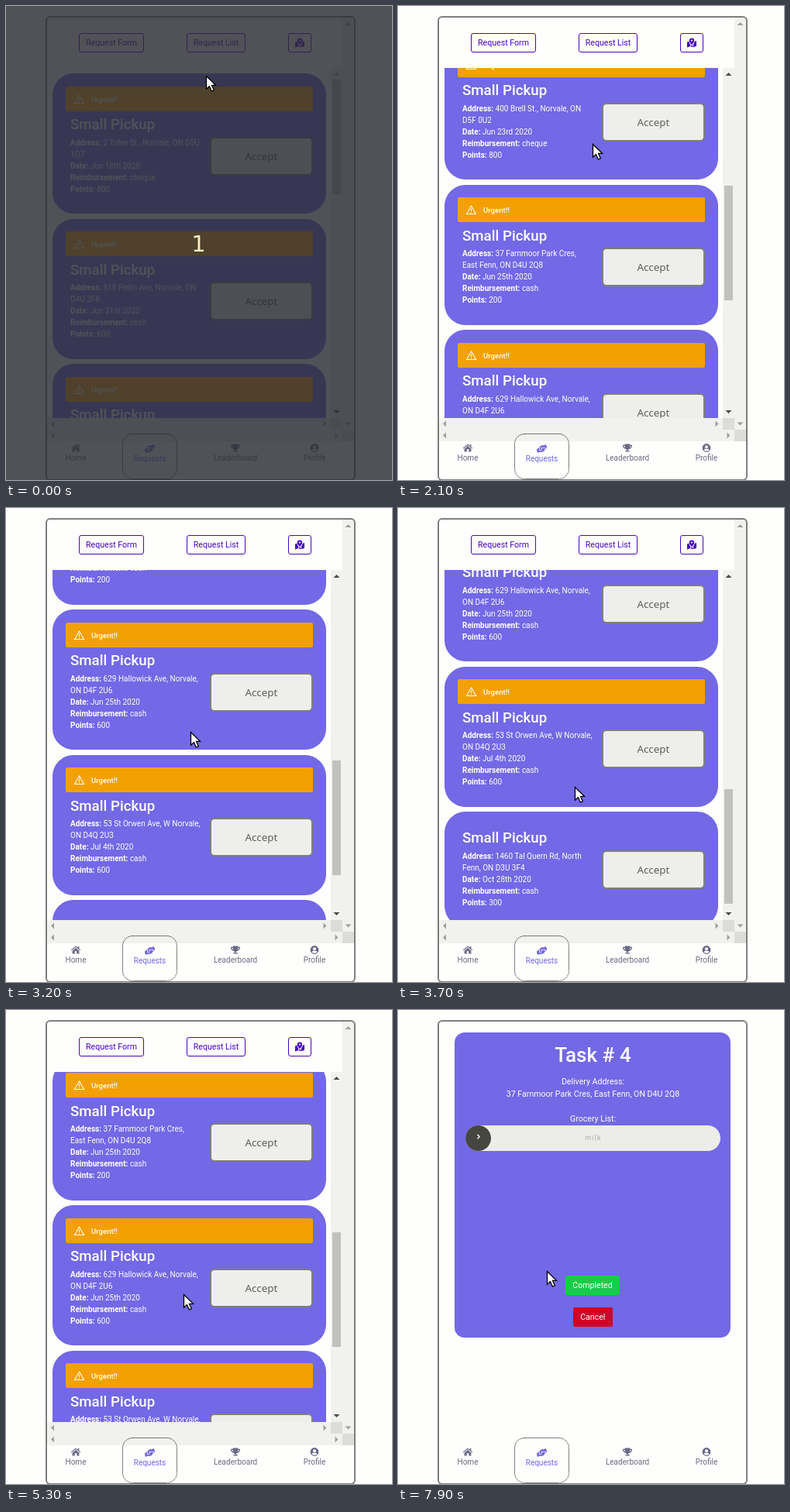
Write an HTML page that moves like this. It is 498 px wide and 612 px high and loops after 8 s.

```html
<!DOCTYPE html>
<html lang="en">
<head>
<meta charset="utf-8">
<title>Pickup requests</title>
<style>
  html, body { margin: 0; width: 100%; height: 100%; overflow: hidden; background: #fefefc; }
  svg { display: block; width: 498px; height: 612px; font-family: Roboto, sans-serif; }
</style>
</head>
<body>
<script>
const LOOP = 8000, STEP = 100, MAX_SCROLL = 837;
const PAGE = '#fefefc', PURPLE = '#7368e6', INDIGO = '#4705c0', GREY = '#6b6a86';
const TRACK = '#f1f1ee', CORNER = '#dcdcd9', FAINT = '#a0a09d', DARK = '#4a4a48';

const cards = [
  ['2 Tolve St., Norvale, ON D5U', '1Q7', 'Jun 18th 2020', 'cheque', 800],
  ['518 Pellin Ave, Norvale, ON', 'D4U 3F8', 'Jun 21st 2020', 'cash', 600],
  ['400 Brell St., Norvale, ON', 'D5F 0U2', 'Jun 23rd 2020', 'cheque', 800],
  ['37 Farnmoor Park Cres,', 'East Fenn, ON D4U 2Q8', 'Jun 25th 2020', 'cash', 200],
  ['629 Hallowick Ave, Norvale,', 'ON D4F 2U6', 'Jun 25th 2020', 'cash', 600],
  ['53 St Orwen Ave, W Norvale,', 'ON D4Q 2U3', 'Jul 4th 2020', 'cash', 600],
  ['1460 Tal Quern Rd, North', 'Fenn, ON D3U 3F4', 'Oct 28th 2020', 'cash', 300],
];

// time, pointer x, pointer y, scroll offset
const track = [
  [0, 258, 90, 0], [1000, 258, 90, 0], [1300, 265, 115, 166], [2100, 251, 178, 419],
  [3200, 238, 289, 706], [3700, 228, 360, 820], [3800, 227, 363, 832], [3900, 227, 363, 832],
  [4000, 227, 364, 837], [4100, 227, 364, 837], [4200, 227, 366, 837], [4300, 227, 366, 837],
  [4400, 227, 368, 837], [4500, 227, 368, 837], [4600, 227, 368, 827], [5300, 229, 367, 585],
  [6300, 307, 287, 468], [6400, 320, 287, 468], [6500, 317, 287, 468], [7000, 317, 287, 468],
  [7300, 274, 313, 468], [7400, 274, 313, 468], [7700, 232, 347, 468], [7900, 192, 337, 468],
];

function add(parent, tag, attrs, text) {
  const node = document.createElementNS('http://www.w3.org/2000/svg', tag);
  for (const k in attrs) node.setAttribute(k, attrs[k]);
  if (text !== undefined) node.textContent = text;
  parent.append(node);
  return node;
}
const group = (p, attrs = {}) => add(p, 'g', attrs);
const rect = (p, x, y, width, height, fill, rx = 0, more = {}) =>
  add(p, 'rect', { x, y, width, height, fill, rx, ...more });
const path = (p, d, more = {}) => add(p, 'path', { d, ...more });
const label = (p, x, y, size, fill, text, more = {}) =>
  add(p, 'text', { x, y, fill, 'font-size': size, ...more }, text);
const centred = (p, x, y, size, fill, text, more = {}) =>
  label(p, x, y, size, fill, text, { 'text-anchor': 'middle', ...more });
const arrow = (p, x, y, turn, fill = FAINT) =>
  path(p, 'M-4 2L0 -2L4 2Z', { fill, transform: `translate(${x} ${y}) rotate(${turn})` });
const moveTo = (node, x, y) => node.setAttribute('transform', `translate(${x} ${y})`);

const svg = add(document.body, 'svg', { viewBox: '0 0 498 612' });
rect(svg, 0, 0, 498, 612, PAGE);

// Request list
const listPage = group(svg);
const clip = add(add(svg, 'defs'), 'clipPath', { id: 'view' });
rect(clip, 53, 80, 366, 452, PAGE);
const view = group(listPage, { 'clip-path': 'url(#view)' });

function makeCard(info, i) {
  const urgent = i < 6, lift = urgent ? 0 : 31.7;
  const root = group(view);
  rect(root, 60, 0, 353, urgent ? 181 : 149, PURPLE, 27);
  const parts = [];
  const part = dy => {
    const g = group(view);
    parts.push([g, dy]);
    return g;
  };
  if (urgent) {
    const bar = part(16.6);
    rect(bar, 77, 0, 319, 32, '#f3a004', 2);
    path(bar, 'M94.5 11L100.5 21.5H88.5ZM94.5 14.6V18M94.5 19V20.2',
      { fill: 'none', stroke: '#fff', 'stroke-width': 1.1 });
    label(bar, 110, 20, 9.6, '#fff', 'Urgent!!', { 'font-weight': 500 });
  }
  label(part(71.9 - lift), 83, 0, 18.72, '#fff', 'Small Pickup', { 'font-weight': 500 });
  const body = part(92.6 - lift);
  const [street, rest, date, pay, points] = info;
  [['Address:', street], ['', rest], ['Date:', date], ['Reimbursement:', pay], ['Points:', points]]
    .forEach(([name, value], row) => {
      const line = label(body, 83, row * 15, 10, '#fff');
      if (name) add(line, 'tspan', { 'font-weight': 700 }, name);
      add(line, 'tspan', {}, (name ? ' ' : '') + value);
    });
  const button = part(81.6 - lift);
  rect(button, 264, 1, 131, 48, '#eeeeea', 5, { stroke: '#7f7f78', 'stroke-width': 2 });
  centred(button, 329.3, 30, 13.33, '#5f5f5b', 'Accept', { 'font-family': 'Noto Sans, sans-serif' });
  return { top: 87.2 + 187.5 * i, parts: [[root, 0], ...parts] };
}
const list = cards.map(makeCard);

function outlined(x, w, text) {
  rect(listPage, x + .5, 35.5, w - 1, 24, 'none', 2.5, { stroke: INDIGO });
  if (text) centred(listPage, x + w / 2, 51, 10.6, INDIGO, text);
}
outlined(94, 84, 'Request Form');
outlined(233, 76, 'Request List');
outlined(364, 30);
path(listPage, 'M373 46.5L375.4 45.5Q376 48 377 49.5V52L373 53.5ZM377.6 50.2L379 51.5L380.5 50V53.3L377.6 52.2Z' +
  'M381.2 49.2Q382.5 47.5 382.6 45.8L385 45V51.7L381.2 53.3Z' +
  'M379 50.2Q375.8 46.5 375.8 44.7A3.2 3.2 0 0 1 382.2 44.7Q382.2 46.5 379 50.2Z' +
  'M379 43.5A1.1 1.1 0 1 0 379 45.7A1.1 1.1 0 1 0 379 43.5Z', { fill: INDIGO, 'fill-rule': 'evenodd' });

// Scroll bars
rect(listPage, 434, 15, 15, 532, TRACK);
rect(listPage, 53, 547, 381, 15, TRACK);
rect(listPage, 434, 547, 15, 15, CORNER);
rect(listPage, 419, 80, 15, 452, TRACK);
rect(listPage, 53, 532, 366, 15, TRACK);
rect(listPage, 419, 532, 15, 15, CORNER);
arrow(listPage, 441.5, 23, 0);
arrow(listPage, 441.5, 539.5, 180);
for (const [y, right] of [[539.5, 411.5], [554.5, 426.5]]) {
  arrow(listPage, 60, y, -90);
  arrow(listPage, right, y, 90);
}
const upArrow = arrow(listPage, 426.5, 88, 0);
const downArrow = arrow(listPage, 426.5, 524, 180);
const thumb = rect(listPage, 421, 0, 11, 148, '#c1c1be');

// Accepted task
const taskPage = group(svg);
rect(taskPage, 73, 29, 356, 394, PURPLE, 13);
centred(taskPage, 251.5, 67, 26, '#fff', 'Task # 4', { 'font-weight': 500 });
centred(taskPage, 251.5, 96, 10.6, '#fff', 'Delivery Address:');
centred(taskPage, 251.5, 112, 10.6, '#fff', cards[3][0] + ' ' + cards[3][1]);
centred(taskPage, 251.5, 144, 10.6, '#fff', 'Grocery List:');
rect(taskPage, 87, 149, 329, 33, '#ecece8', 16.5);
add(taskPage, 'circle', { cx: 103.5, cy: 165.5, r: 16.5, fill: '#464641' });
path(taskPage, 'M102.5 160.8L105.2 163.5L102.5 166.2', { fill: 'none', stroke: '#fff', 'stroke-width': 1.3 });
centred(taskPage, 252, 168, 9, '#adada9', 'milk', { 'letter-spacing': 1.2 });
rect(taskPage, 216, 343, 70, 25, '#12cf46', 2.5);
centred(taskPage, 251, 359, 10.6, '#fff', 'Completed');
rect(taskPage, 226, 384, 51, 25, '#ce0428', 2.5);
centred(taskPage, 251.3, 400, 10.6, '#fff', 'Cancel');

// Window frame and navigation
rect(svg, 52, 14, 398, 598, 'none', 5, { stroke: '#7f7f7f', 'stroke-width': 2 });
rect(svg, 150.5, 552.5, 70, 58, 'none', 13, { stroke: '#000', 'stroke-dasharray': '1 1' });
const nav = [
  ['Home', 90, 587, 'M-6.3 .3L0 -5L2.8 -2.7V-4.4H4.4V-1.3L6.3 .3L5.6 1.1L0 -3.5L-5.6 1.1Z' +
    'M-4.4 1.2L0 -2.4L4.4 1.2V5H1.3V1.8H-1.3V5H-4.4Z'],
  ['Requests', 185.5, 588, 'M-6.3 .5L-3.6 -1.2V1.2A1.8 1.8 0 0 0 0 1.2V-.8H4.4V1.2H3.4V2.2A1.2 1.2 0 0 1 2.2 3.4H1.6' +
    'A1.5 1.5 0 0 1 .2 4.4H-3L-5 5.6L-6.3 3.6ZM-2.8 -2.4L0 -4.2H3L5 -5.5L6.4 -3V-.2L5.2 .6V-1.6H-.8V1.2A1 1 0 0 1 -2.8 1.2Z'],
  ['Leaderboard', 296, 587, 'M-3.4 -5H3.4V-3.8H6V-2Q5.6 .6 2.6 1.2Q1.8 2.2 .8 2.4V3.8H2.8V5H-2.8V3.8H-.8V2.4' +
    'Q-1.8 2.2 -2.6 1.2Q-5.6 .6 -6 -2V-3.8H-3.4ZM-3.4 -2.6H-4.8Q-4.6 -.8 -3 -.2ZM3.4 -2.6H4.8Q4.6 -.8 3 -.2Z'],
  ['Profile', 398, 587, 'M0 -5.4A5.4 5.4 0 1 0 0 5.4A5.4 5.4 0 1 0 0 -5.4Z' +
    'M0 -3.3A2 2 0 1 1 0 .7A2 2 0 1 1 0 -3.3ZM-3.5 2.8Q-3 1.2 -1.4 1.2H1.4Q3 1.2 3.5 2.8Q0 5.8 -3.5 2.8Z'],
];
nav.forEach(([name, x, y, d], i) => {
  const fill = i === 1 ? PURPLE : GREY;
  path(svg, d, { fill, 'fill-rule': 'evenodd', transform: `translate(${x} ${i === 1 ? 571.5 : 570.5})` });
  centred(svg, x, y, 10, fill, name);
});

// Countdown shade
const shade = group(svg);
rect(shade, 0, 0, 498, 612, 'rgb(43,45,52)', 0, { opacity: .82 });
centred(shade, 248.5, 317, 29, '#f8efc4', '1', { 'font-family': 'DejaVu Sans, sans-serif' });

const pointer = path(svg, 'M0 .5V17.2L3.9 13.6L6.8 20L9.8 18.6L7 12.4H12Z',
  { fill: '#fff', stroke: '#000', 'stroke-width': 1.3 });

function sample(t) {
  const next = track.findIndex(k => k[0] > t);
  if (next < 0) return track[track.length - 1];
  const a = track[next - 1], b = track[next], f = (t - a[0]) / (b[0] - a[0]);
  return a.map((v, i) => v + (b[i] - v) * f);
}

const show = (node, on) => node.setAttribute('display', on ? 'inline' : 'none');

function draw(ms) {
  const t = Math.floor(ms % LOOP / STEP) * STEP;
  const [, x, y, offset] = sample(t);
  const scroll = Math.round(offset);
  show(shade, t < 500);
  show(listPage, t < 6800);
  show(taskPage, t >= 6800);
  for (const { top, parts } of list)
    for (const [node, dy] of parts) moveTo(node, 0, Math.round(top + dy - scroll));
  thumb.setAttribute('y', Math.round(95 + scroll * 274 / MAX_SCROLL));
  upArrow.setAttribute('fill', scroll > 0 ? DARK : FAINT);
  downArrow.setAttribute('fill', scroll < MAX_SCROLL ? DARK : FAINT);
  moveTo(pointer, Math.round(x) + .5, Math.round(y));
}

let start;
function tick(now) {
  start ??= now;
  draw(Math.max(0, now - start));
  requestAnimationFrame(tick);
}
draw(0);
requestAnimationFrame(tick);
</script>
</body>
</html>
```
